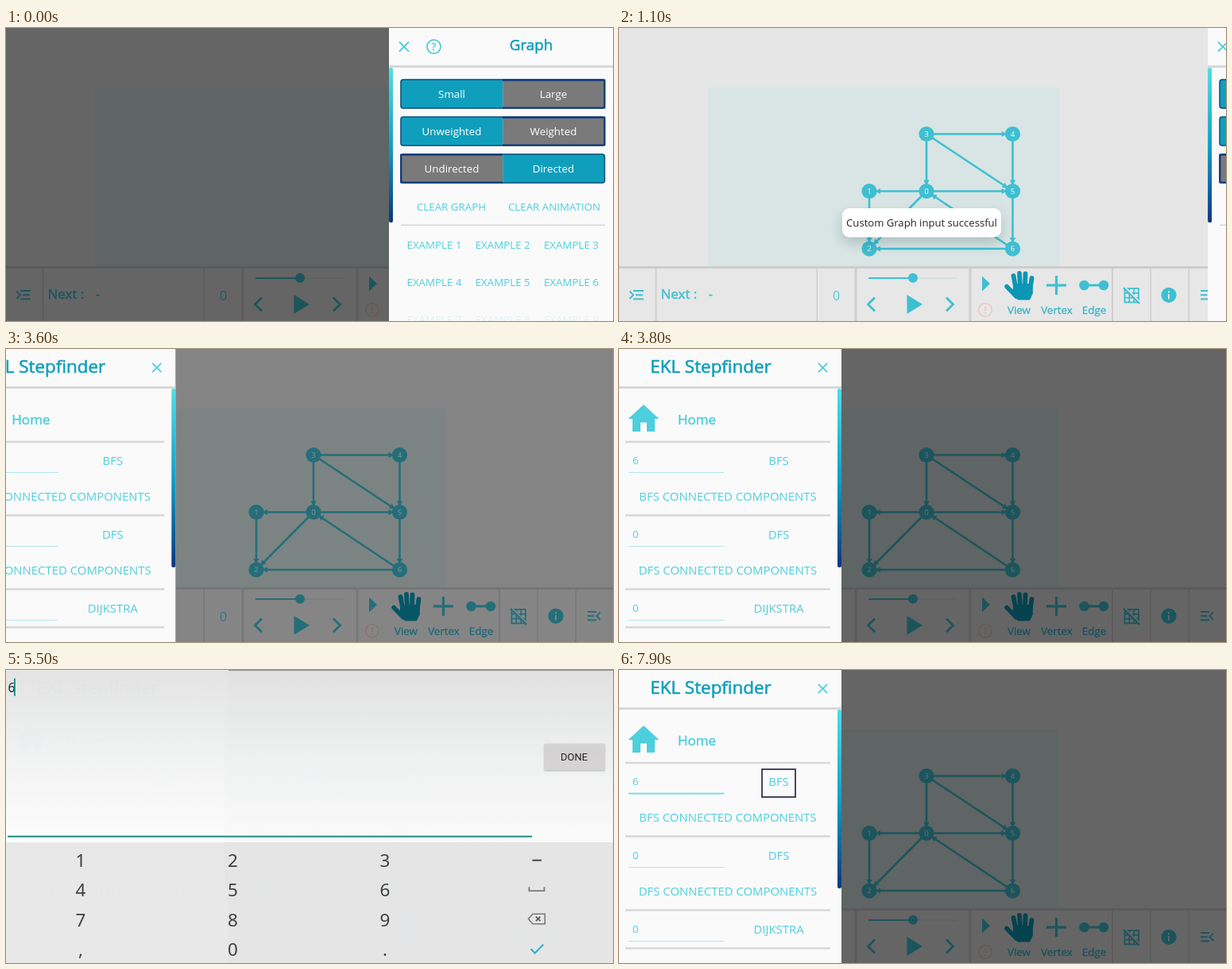
An HTML page with a canvas for the animation above (8 s loop, 764 by 369 pixels).

```html
<!DOCTYPE html>
<html lang="en">
<head>
<meta charset="utf-8">
<title>Graph tool</title>
<style>
html, body { margin: 0; width: 100%; height: 100%; overflow: hidden; background: #e6e6e6; }
canvas { display: block; width: 764px; height: 369px; }
</style>
</head>
<body>
<canvas id="stage" width="764" height="369"></canvas>
<script>
const W = 764, H = 369, LOOP = 8000;
const ctx = document.getElementById('stage').getContext('2d');
const SANS = '"Open Sans", "Noto Sans", sans-serif';
const TEAL = '#3fbfd2', LIGHT = '#4dcfdd', DEEP = '#0f9fbd', NAVY = '#103a7c', RULE = '#d8d8d8';

const clamp = v => Math.max(0, Math.min(1, v));
const progress = (t, start, length) => clamp((t - start) / length);
const easeOut = (p, power = 2) => 1 - Math.pow(1 - p, power);
const within = (t, a, b) => t >= a && t < b;

function rect(x, y, w, h, color) {
  ctx.fillStyle = color;
  ctx.fillRect(x, y, w, h);
}

function roundRect(x, y, w, h, r, color) {
  ctx.beginPath();
  ctx.roundRect(x, y, w, h, r);
  ctx.fillStyle = color;
  ctx.fill();
}

function circle(x, y, r, color) {
  ctx.beginPath();
  ctx.arc(x, y, r, 0, 7);
  ctx.fillStyle = color;
  ctx.fill();
}

function ring(x, y, r, color, width) {
  ctx.beginPath();
  ctx.arc(x, y, r, 0, 7);
  ctx.strokeStyle = color;
  ctx.lineWidth = width;
  ctx.stroke();
}

function trace(points) {
  ctx.beginPath();
  for (let i = 0; i < points.length; i += 2) ctx.lineTo(points[i], points[i + 1]);
}

function line(points, color, width, cap = 'butt') {
  trace(points);
  ctx.strokeStyle = color;
  ctx.lineWidth = width;
  ctx.lineCap = cap;
  ctx.stroke();
}

function shape(points, color) {
  trace(points);
  ctx.fillStyle = color;
  ctx.fill();
}

// y is the middle of the capitals; heavy thickens the strokes a little
function text(str, x, y, size, color, { align = 'center', heavy = 0, font = SANS, style = '' } = {}) {
  ctx.font = `${style} ${size}px ${font}`;
  ctx.textAlign = align;
  ctx.fillStyle = color;
  const base = y + size * 0.357;
  ctx.fillText(str, x, base);
  if (heavy) {
    ctx.strokeStyle = color;
    ctx.lineWidth = heavy;
    ctx.lineJoin = 'round';
    ctx.strokeText(str, x, base);
    ctx.lineJoin = 'miter';
  }
}

function cross(x, y, r) {
  line([x - r, y - r, x + r, y + r], LIGHT, 1.8);
  line([x - r, y + r, x + r, y - r], LIGHT, 1.8);
}

function focusRing(x, y, w, h, color) {
  ctx.strokeStyle = color;
  ctx.lineWidth = 1.7;
  ctx.strokeRect(x, y, w, h);
}

const nodes = [[387, 205.5], [315, 205.5], [315, 278], [387, 133.5], [495.5, 133.5], [495.5, 205.5], [495.5, 278]];
const edges = ['34', '30', '35', '45', '01', '05', '12', '02', '56', '60', '62'];

function drawGraph() {
  for (const [from, to] of edges) {
    const [x1, y1] = nodes[from], [x2, y2] = nodes[to];
    line([x1, y1, x2, y2], TEAL, 2.6);
    ctx.save();
    ctx.translate(x2, y2);
    ctx.rotate(Math.atan2(y2 - y1, x2 - x1));
    shape([-7, 0, -14, -3.6, -14, 3.6], TEAL);
    ctx.restore();
  }
  nodes.forEach(([x, y], i) => {
    circle(x, y, 9.6, TEAL);
    text(i, x, y, 9, '#d9f2f4', { heavy: 0.2 });
  });
}

function drawHand() {
  const color = '#0b96b4';
  const fingers = [[499.5, 328, 496.5, 312], [505, 326, 504, 309], [511, 326, 511.5, 309.5], [517.5, 329, 519.5, 315]];
  for (const f of fingers) line(f, color, 5.8, 'round');
  line([488, 325.5, 500, 338], color, 5.5, 'round');
  shape([496.5, 322, 520.5, 322, 521, 334, 517, 342.5, 502, 342.5, 495, 335], color);
}

function menuLines(x1, x2, mid1, mid2) {
  line([x1, 331, x2, 331], TEAL, 2);
  line([mid1, 336.2, mid2, 336.2], TEAL, 2);
  line([x1, 341.4, x2, 341.4], TEAL, 2);
}

function drawToolbar() {
  rect(0, 302, W, 67, '#e7e7e7');
  rect(0, 300, W, 3, '#cdcdcd');
  for (const [x, w] of [[45.5, 2], [248.5, 1.5], [296.5, 3], [440.5, 3], [620, 2], [668.5, 1.5], [716.5, 1.5]])
    rect(x, 303, w, 66, '#cfcfcf');

  line([13.5, 331.5, 18, 336.2, 13.5, 341], TEAL, 1.9);
  menuLines(18, 31, 21, 30);
  text('Next :', 52.5, 334.5, 17, TEAL, { align: 'left', heavy: 0.45 });
  text('-', 115.5, 334.5, 17, TEAL, { heavy: 0.3 });
  text('0', 273.5, 337, 16, LIGHT);

  rect(370, 314, 55, 2, '#d3dfdf');
  rect(314, 314, 56, 2, TEAL);
  circle(370, 314.7, 6, TEAL);
  line([322, 339.5, 313.5, 348, 322, 356.5], TEAL, 2.8);
  line([412, 339.5, 420.5, 348, 412, 356.5], TEAL, 2.8);
  shape([362.5, 336, 382, 348, 362.5, 360], TEAL);
  shape([457, 312.5, 467, 322, 457, 331.5], TEAL);
  ring(461, 355, 8.3, '#ecc9cb', 1.6);
  rect(460.2, 350, 1.7, 6, '#ecc9cb');
  rect(460.2, 358, 1.7, 1.8, '#ecc9cb');

  drawHand();
  line([538, 324, 563, 324], TEAL, 3.2);
  line([550.5, 312, 550.5, 336], TEAL, 3.2);
  line([585.5, 324, 610, 324], TEAL, 3);
  circle(585.5, 324, 6.3, TEAL);
  circle(610, 324, 6.3, TEAL);
  [['View', 503.5], ['Vertex', 551], ['Edge', 598]].forEach(([s, x]) =>
    text(s, x, 355.5, 13.4, '#2fb6ca', { heavy: 0.3 }));

  ctx.strokeStyle = TEAL;
  ctx.lineWidth = 1.8;
  ctx.strokeRect(636.5, 328, 17.5, 17.5);
  for (const d of [5.8, 11.7]) {
    line([636.5 + d, 328, 636.5 + d, 345.5], TEAL, 1.7);
    line([636.5, 328 + d, 654, 328 + d], TEAL, 1.7);
  }
  line([636, 325.5, 657, 346.5], '#e7e7e7', 2);
  line([635, 327, 655, 347], TEAL, 1.9);
  circle(692, 336.3, 9.6, TEAL);
  rect(691, 331.2, 2, 2.2, '#e7e7e7');
  rect(691, 335.2, 2, 6.3, '#e7e7e7');
  menuLines(732, 743, 732, 740.5);
  line([748, 331.5, 743.5, 336.2, 748, 341], TEAL, 1.9);
}

function scrollBar(x, height) {
  const g = ctx.createLinearGradient(0, 50, 0, 50 + height);
  g.addColorStop(0, '#52dde6');
  g.addColorStop(0.5, '#129fc4');
  g.addColorStop(1, '#0b3580');
  roundRect(x, 50, 5, height, 2, g);
}

function toggle(y, left, right, rightOn) {
  ctx.save();
  ctx.beginPath();
  ctx.roundRect(496.5, y, 257.5, 37, 3);
  ctx.clip();
  [[496.5, left, !rightOn], [625.2, right, rightOn]].forEach(([x, , on]) =>
    rect(x, y, 128.8, 37, on ? DEEP : '#7a7a7a'));
  ctx.restore();
  ctx.strokeStyle = '#124f7c';
  ctx.lineWidth = 1.5;
  ctx.beginPath();
  ctx.roundRect(497, y + 0.5, 256.5, 36, 3);
  ctx.stroke();
  const x = rightOn ? 497.3 : 753.3, inner = 625;
  line([inner, y + 1.1, x, y + 1.1, x, y + 36, inner, y + 36], NAVY, 2.2);
  text(left, 561, y + 18.5, 13.33, '#fff');
  text(right, 689, y + 18.5, 13.33, '#fff');
}

function drawGraphPanel(shift) {
  ctx.save();
  ctx.translate(shift, 0);
  rect(482, 0, 282, H, '#fbfafb');
  rect(482, 47, 282, 3, RULE);
  scrollBar(482, 195);
  cross(501, 23.5, 6);
  ring(538.5, 23.5, 8.6, LIGHT, 1.8);
  text('?', 538.5, 23.5, 13, LIGHT, { heavy: 0.4 });
  text('Graph', 661, 21.5, 18.8, DEEP, { heavy: 0.6 });
  toggle(64.5, 'Small', 'Large', false);
  toggle(111.5, 'Unweighted', 'Weighted', false);
  toggle(158.5, 'Undirected', 'Directed', true);
  text('CLEAR GRAPH', 560.5, 225, 13.33, LIGHT);
  text('CLEAR ANIMATION', 690, 225, 13.33, LIGHT);
  rect(497, 247.5, 257, 1.5, RULE);
  for (let i = 0; i < 9; i++) {
    const row = Math.floor(i / 3);
    ctx.globalAlpha = row === 2 ? 0.15 : 1;
    text('EXAMPLE ' + (i + 1), 539 + (i % 3) * 86.2, 273 + row * 47.3, 13.33, LIGHT);
  }
  ctx.restore();
}

function drawMenuPanel(shift, t) {
  ctx.save();
  ctx.translate(shift, 0);
  rect(0, 0, 280, H, '#fbfafb');
  rect(0, 47, 280, 3, RULE);
  scrollBar(275, 225);
  text('EKL Stepfinder', 115.5, 22, 22.4, DEEP, { heavy: 0.6 });
  cross(256.5, 23.5, 5.6);
  shape([31, 70, 50.5, 88, 45, 88, 45, 104, 35, 104, 35, 92.5, 27, 92.5, 27, 104, 17, 104, 17, 88, 11.5, 88], LIGHT);
  text('Home', 74, 88.5, 17, LIGHT, { align: 'left', heavy: 0.45 });
  for (const y of [115.7, 208.2, 301.2, 349.2]) rect(8, y, 258, 2.5, RULE);

  [['6', 'BFS'], ['0', 'DFS'], ['0', 'DIJKSTRA']].forEach(([value, name], i) => {
    const y = 141 + i * 93;
    text(value, 17, y - 0.5, 13.33, LIGHT, { align: 'left' });
    rect(12, y + 14, 120.5, 1, '#b4e6ea');
    text(name, 201, y, 14.9, LIGHT);
    if (i < 2) text(name + ' CONNECTED COMPONENTS', 137, y + 45, 14.9, LIGHT);
  });
  if (t >= 4800) rect(12, 154.6, 120.5, 2, '#7fdde5');
  if (within(t, 4700, 4800)) focusRing(7, 122, 130.8, 42.5, '#1b2a62');
  if (t >= 7900) focusRing(180, 125, 42, 35, '#2a2940');
  ctx.restore();
}

function drawToast(t) {
  const enter = easeOut(progress(t, 600, 300), 3);
  const leave = easeOut(progress(t, 2750, 400), 4);
  const alpha = enter * (1 - leave);
  if (alpha <= 0) return;
  ctx.save();
  ctx.globalAlpha = alpha;
  ctx.translate(0, 35 * (1 - enter) - 40 * leave);
  ctx.shadowColor = 'rgba(0,40,50,.2)';
  ctx.shadowBlur = 16;
  ctx.shadowOffsetY = 7;
  roundRect(281, 227, 200, 36.5, 9, '#fff');
  ctx.shadowColor = 'transparent';
  text('Custom Graph input successful', 381, 245.5, 13.1, '#262626');
  ctx.restore();
}

function drawKeypad(t) {
  const enter = progress(t, 4950, 1000);
  const leave = progress(t, 7000, 350);
  const alpha = easeOut(enter, 5) * (1 - leave * leave);
  if (alpha <= 0) return;
  ctx.save();
  ctx.globalAlpha = alpha;
  ctx.translate(0, 37 * (Math.pow(1 - enter, 5) + leave * leave));

  const g = ctx.createLinearGradient(0, 0, 0, 216);
  g.addColorStop(0, '#e3e3e3');
  g.addColorStop(0.5, '#f1f2f2');
  g.addColorStop(1, '#fefdfe');
  rect(0, 0, W, 217, g);
  rect(0, 216.5, W, H, '#e8e8e8');
  const digits = { font: '"Noto Sans", "Open Sans", sans-serif', style: 'extra-condensed' };
  text('6', 2.5, 21.5, 15.5, '#222', { ...digits, align: 'left' });
  if (t < 5900 || within(t, 6400, 6700)) rect(10, 10, 1.8, 22, '#128a84');
  rect(2, 208, 660, 2, '#128a7c');

  const pressed = within(t, 6800, 7000);
  ctx.shadowColor = 'rgba(0,0,0,.25)';
  ctx.shadowBlur = 2;
  ctx.shadowOffsetY = 1;
  roundRect(677.5, 92, 76.5, 33.5, 2, pressed ? '#d0cece' : '#d6d4d5');
  ctx.shadowColor = 'transparent';
  if (pressed) focusRing(676, 91.5, 82, 34.2, '#1d3a80');
  text('DONE', 715, 109, 13, '#222', { font: 'Roboto, sans-serif' });

  ['123', '456', '789', ',0.'].forEach((row, r) => {
    [...row].forEach((key, c) => text(key, 94 + c * 191.5, 239 + r * 37.5, 22.5, '#3c3c3c', digits));
  });
  rect(662.5, 238, 11.5, 2, '#444');
  line([658.5, 272.5, 658.5, 277.5, 677.5, 277.5, 677.5, 272.5], '#777', 1.8);
  line([657.5, 312.8, 663, 306.5, 678.3, 306.5, 678.3, 319, 663, 319, 657.5, 312.8, 658.5, 311.5], '#777', 1.6);
  line([667, 310, 672.5, 315.5], '#555', 1.6);
  line([667, 315.5, 672.5, 310], '#555', 1.6);
  line([660.5, 350.5, 665.8, 355.8, 676.3, 345], '#2aa9d2', 2);
  ctx.restore();
}

function draw(t) {
  ctx.globalAlpha = 1;
  rect(0, 0, W, H, '#e6e6e6');
  rect(112, 75, 442, 226, '#d8e5e4');
  if (t >= 500) drawGraph();
  drawToolbar();

  const closed = easeOut(progress(t, 958, 200));
  const opened = easeOut(progress(t, 3473, 250));
  const dim = 1 - easeOut(progress(t, 930, 170)) + opened;
  if (dim > 0) rect(0, 0, W, H, `rgba(0,0,0,${0.56 * dim})`);
  if (closed < 1) drawGraphPanel(282 * closed);
  if (opened > 0) drawMenuPanel(-280 * (1 - opened), t);
  drawToast(t);
  drawKeypad(t);
}

const begin = performance.now();
function tick() {
  draw((performance.now() - begin) % LOOP);
  requestAnimationFrame(tick);
}
tick();
</script>
</body>
</html>
```
